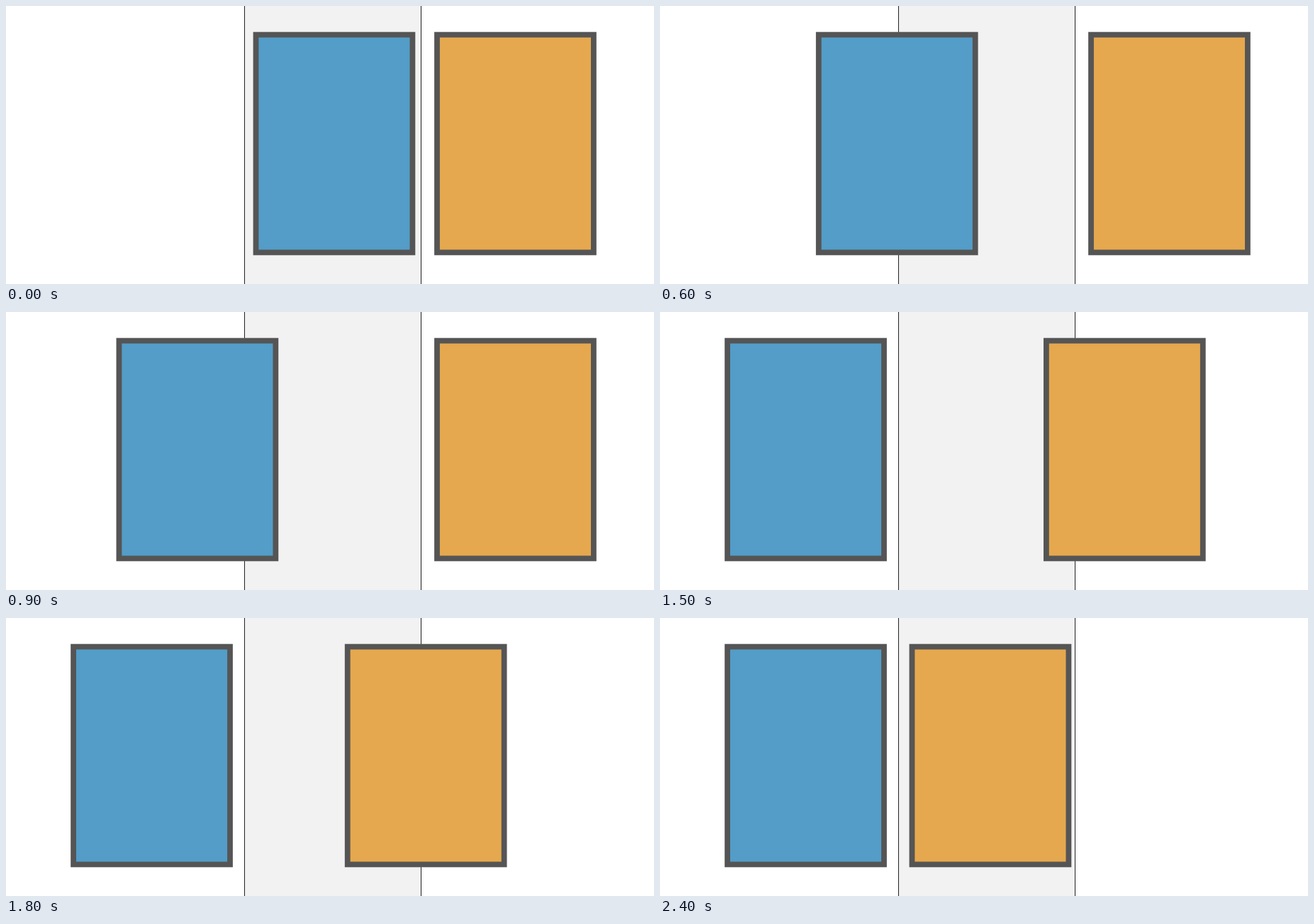
Recreate the animation shown at these times as an HTML page. Size 914 by 393 pixels, loop 2700 ms.

```html
<!DOCTYPE html>
<html lang="en">
<head>
<meta charset="utf-8">
<title>Sliding panels</title>
<style>
  html, body { margin: 0; height: 100%; overflow: hidden; background: #fff; }
  svg { display: block; }
  .panel { stroke: #555; stroke-width: 7.8; }
</style>
</head>
<body>
<svg width="914" height="393">
  <rect x="336" width="250" height="393" fill="#f2f2f2"/>
  <path d="M336.5 0V393M585.5 0V393" stroke="#222"/>
  <rect id="blue" class="panel" y="40.6" width="220.9" height="307.8" fill="#539dc8"/>
  <rect id="orange" class="panel" y="40.6" width="220.9" height="307.8" fill="#e5a84e"/>
</svg>
<script>
  const STEP = 300, STEPS = 9, HALF = 4;
  const blue = document.getElementById('blue');
  const orange = document.getElementById('orange');

  // The blue panel leaves in four jumps, then the orange one enters in four.
  function draw(time) {
    const step = Math.floor(time / STEP) % STEPS;
    blue.setAttribute('x', 352.5 - 64.35 * Math.min(step, HALF));
    orange.setAttribute('x', 608 - 63.13 * Math.max(step - HALF, 0));
  }

  function tick() {
    draw(performance.now() - start);
    requestAnimationFrame(tick);
  }

  const start = performance.now();
  tick();
</script>
</body>
</html>
```
